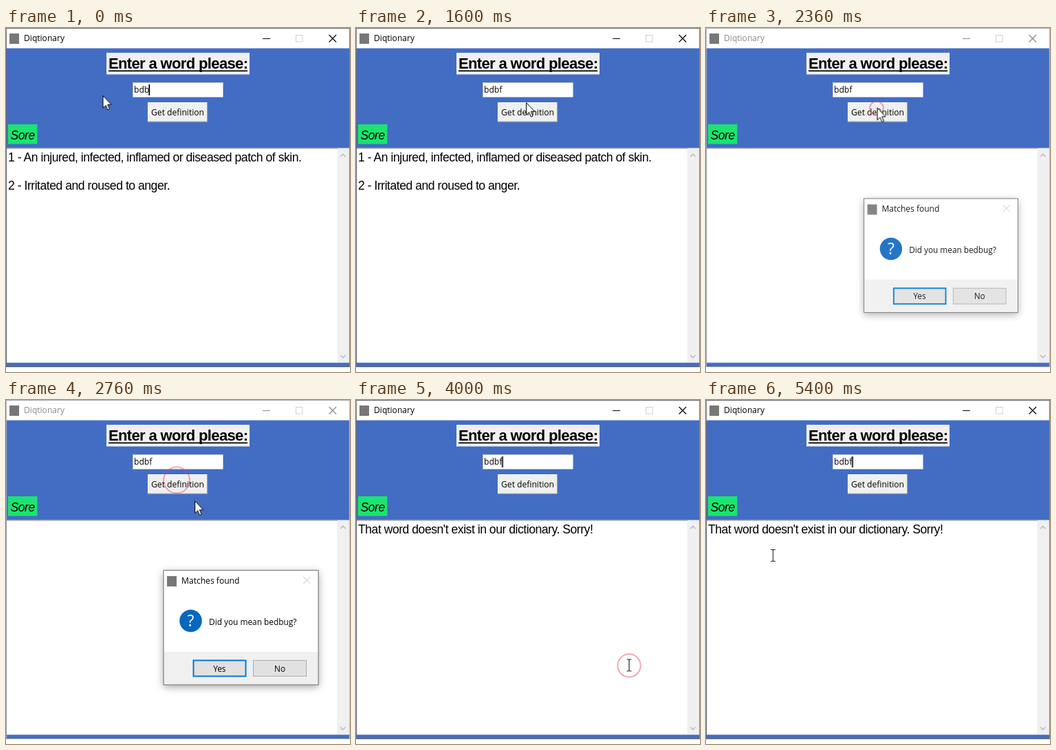
Write an HTML page that moves like this. It is 500 px wide and 500 px high and loops after 5520 ms.

```html
<!DOCTYPE html>
<html lang="en">
<head>
<meta charset="utf-8">
<title>Diqtionary</title>
<style>
  html, body { margin: 0; width: 100%; height: 100%; overflow: hidden; background: #fff; }
  svg { display: block; width: 500px; height: 500px; }

  text { fill: currentColor; white-space: pre; }
  .ui { font: 12.1px "Open Sans", "Noto Sans", sans-serif; }
  .box { font-size: 11.85px; }
  .doc { font: 17.6px "Liberation Sans", Arial, sans-serif; letter-spacing: -.48px; }
  .word { font-style: italic; }
  .head { font: bold 22px "Liberation Sans", Arial, sans-serif; letter-spacing: -.64px; }
  .mid { text-anchor: middle; }
  .line { fill: none; stroke: currentColor; }

  /* One 5520 ms loop; hard changes unless a part eases itself */
  .t { animation: 5.52s step-end infinite; }

  #bar { animation-name: bar; }
  @keyframes bar {
    0%, 61.957% { color: #000; }
    39.855% { color: #8a8a8a; }
  }
  #frame { fill: none; animation-name: frame; }
  @keyframes frame {
    0%, 61.957% { stroke: #6b6b6b; }
    39.855% { stroke: #ababab; }
  }

  #typed { animation-name: typed; }
  @keyframes typed {
    0% { visibility: hidden; }
    3.623%, 100% { visibility: visible; }
  }
  #caret { animation-name: blink, shift; }
  @keyframes blink {
    0%, 15.942%, 32.246%, 61.957%, 78.261%, 94.565% { visibility: visible; }
    10.87%, 26.812%, 39.855%, 72.826%, 89.13% { visibility: hidden; }
    100% { visibility: visible; }
  }
  @keyframes shift {
    0% { transform: none; }
    3.623%, 100% { transform: translateX(4.6px); }
  }

  #found { animation-name: found; }
  @keyframes found {
    0% { visibility: visible; }
    39.855%, 100% { visibility: hidden; }
  }
  #sorry { animation-name: sorry; }
  @keyframes sorry {
    0% { visibility: hidden; }
    61.957%, 100% { visibility: visible; }
  }

  #dialog { transform-origin: 341.5px 330.5px; animation-name: dialog; animation-timing-function: linear; }
  #dialog .back { filter: drop-shadow(0 3px 6px rgba(0, 0, 0, .36)); }
  @keyframes dialog {
    0% { opacity: 0; transform: scale(.95); }
    39.855% { opacity: 0; transform: scale(.95); animation-timing-function: ease-out; }
    43.841% { opacity: 1; transform: none; }
    61.957% { opacity: 1; transform: none; }
    64.855%, 100% { opacity: 0; transform: scale(.95); }
  }
  #yes { animation-name: yes; }
  @keyframes yes {
    0% { stroke: #0078d7; stroke-width: 2px; }
    59.058%, 100% { stroke: #adadad; stroke-width: 1px; }
  }
  #no { animation-name: no; }
  @keyframes no {
    0% { stroke: #adadad; fill: #e1e1e1; }
    56.159%, 100% { stroke: #0078d7; fill: #e0effb; }
  }

  .ring { r: 0; opacity: 0; fill: none; stroke: #dc4655; stroke-width: 2; animation-timing-function: linear; }
  #ring1 { animation-name: ring1; }
  #ring2 { animation-name: ring2; }
  @keyframes ring1 {
    0%, 34.782% { r: 0; opacity: 0; }
    34.783% { r: 0; opacity: .45; }
    52.536% { r: 22px; opacity: .45; }
    52.537%, 100% { r: 22px; opacity: 0; }
  }
  @keyframes ring2 {
    0%, 59.057% { r: 0; opacity: 0; }
    59.058% { r: 0; opacity: .45; }
    76.812% { r: 22px; opacity: .45; }
    76.813%, 100% { r: 22px; opacity: 0; }
  }

  #mouse { animation-name: mouse; animation-timing-function: linear; }
  @keyframes mouse {
    0% { transform: translate(140.5px, 98px); }
    21.014% { transform: translate(140.5px, 98px); animation-timing-function: ease-in-out; }
    28.261%, 28.986% { transform: translate(247px, 108px); }
    33.333% { transform: translate(248.5px, 115.5px); }
    44.928% { transform: translate(248.5px, 115.5px); animation-timing-function: ease-in; }
    50% { transform: translate(274px, 146px); animation-timing-function: cubic-bezier(.4, .2, .4, 1); }
    57.971% { transform: translate(397px, 385.5px); }
    81.159% { transform: translate(397px, 385.5px); animation-timing-function: cubic-bezier(.5, .2, .8, .8); }
    82.609% { transform: translate(335px, 352px); }
    83.333% { transform: translate(291px, 325px); animation-timing-function: cubic-bezier(.2, .45, .4, 1); }
    89.855%, 100% { transform: translate(97.5px, 226px); }
  }
  #arrow { animation-name: arrow; }
  #beam { animation-name: beam; }
  @keyframes arrow {
    0% { visibility: visible; }
    65.942%, 100% { visibility: hidden; }
  }
  @keyframes beam {
    0% { visibility: hidden; }
    65.942%, 100% { visibility: visible; }
  }
</style>
</head>
<body>
<svg viewBox="0 0 500 500" color="#000">
  <rect width="500" height="500" fill="#fff"/>
  <rect y="29.5" width="499" height="463.5" fill="#436dc3"/>

  <!-- Title bar -->
  <g id="bar" class="t">
    <rect x="5" y="8" width="14" height="15" fill="#777"/>
    <text class="ui" x="26" y="19.3">Diqtionary</text>
    <path class="line" d="M373 15.5h11M469.5 10l10.5 10.5M480 10l-10.5 10.5" stroke-width="1.2"/>
    <rect x="421.5" y="10.5" width="9.5" height="9.5" fill="none" stroke="#d0d0d0"/>
  </g>

  <!-- Form -->
  <rect x="146" y="36" width="208" height="31.5" fill="#f0f0f0"/>
  <text class="head" x="149" y="59.3">Enter a word please:</text>
  <path d="M149 62.3h202" stroke="#000" stroke-width="1.8"/>

  <rect x="184" y="79" width="131.5" height="21.5" fill="#fff"/>
  <path d="M184.5 100V79.5H315" fill="none" stroke="#c6c8cf"/>
  <text class="ui" x="186" y="94.3">bdb<tspan id="typed" class="t">f</tspan></text>
  <rect id="caret" class="t" x="207.4" y="82" width="1.8" height="16"/>

  <rect x="206" y="108" width="87" height="28.5" fill="#f0f0f0"/>
  <path d="M206.5 136V108.5H293" fill="none" stroke="#fff"/>
  <path d="M206 136.2H292.7V108" fill="none" stroke="#8b8b8b"/>
  <text class="ui mid" x="249.5" y="127.3">Get definition</text>

  <rect x="3" y="140" width="42.5" height="28.5" fill="#19e570"/>
  <text class="doc word" x="6.5" y="161.5">Sore</text>

  <!-- Result area -->
  <rect x="1" y="174.5" width="498" height="312" fill="#fff"/>
  <rect x="481.5" y="175" width="16.5" height="311" fill="#f0f0f0"/>
  <path d="M1 175h481" stroke="#8e8e8e"/>
  <path d="M486 187l3.7-3.7 3.7 3.7M486 475.5l3.7 3.7 3.7-3.7" fill="none" stroke="#b9b9b9" stroke-width="1.5"/>
  <g id="found" class="t doc">
    <text x="3" y="193.5">1 - An injured, infected, inflamed or diseased patch of skin.</text>
    <text x="3" y="234.5">2 - Irritated and roused to anger.</text>
  </g>
  <text id="sorry" class="t doc" x="3" y="193.5">That word doesn't exist in our dictionary. Sorry!</text>
  <rect id="frame" class="t" x=".7" y=".5" width="498.6" height="492"/>

  <!-- Dialog -->
  <g id="dialog" class="t">
    <rect class="back" x="229" y="247.5" width="225" height="166.5" fill="#fff"/>
    <rect x="229" y="366" width="225" height="48" fill="#f0f0f0"/>
    <rect x="229" y="247.5" width="225" height="166.5" fill="none" stroke="#6f6f6f"/>
    <rect x="234" y="256" width="14" height="15" fill="#777"/>
    <text class="ui" x="255" y="266.5">Matches found</text>
    <path d="M432.3 257l10 10M442.3 257l-10 10" fill="none" stroke="#c4c4c4"/>
    <circle cx="268.5" cy="321" r="16.3" fill="#0867bd"/>
    <text class="mid" x="268.5" y="329" color="#fff" font-family="Open Sans, Noto Sans, sans-serif" font-size="23">?</text>
    <text class="ui box" x="295" y="326.8">Did you mean bedbug?</text>
    <rect id="yes" class="t" x="272.5" y="378.5" width="76" height="23" fill="#e1e1e1"/>
    <rect id="no" class="t" x="359.5" y="378.5" width="77" height="23"/>
    <text class="ui box mid" x="310.3" y="394.5">Yes</text>
    <text class="ui box mid" x="398" y="394.5">No</text>
  </g>

  <circle id="ring1" class="t ring" cx="248" cy="116.5"/>
  <circle id="ring2" class="t ring" cx="397" cy="386"/>

  <g id="mouse" class="t">
    <path id="arrow" class="t" d="M.5 .5V18.2L4.5 14.4L7.3 21L10 19.9L7.2 13.3H12.5Z" fill="#fff" stroke="#000"/>
    <path id="beam" class="t" d="M-3.5 -8.5H-1L0 -7.7L1 -8.5H3.5M-3.5 8.5H-1L0 7.7L1 8.5H3.5M0 -7.7V7.7" fill="none" stroke="#222" stroke-width="1.2"/>
  </g>
</svg>
</body>
</html>
```
